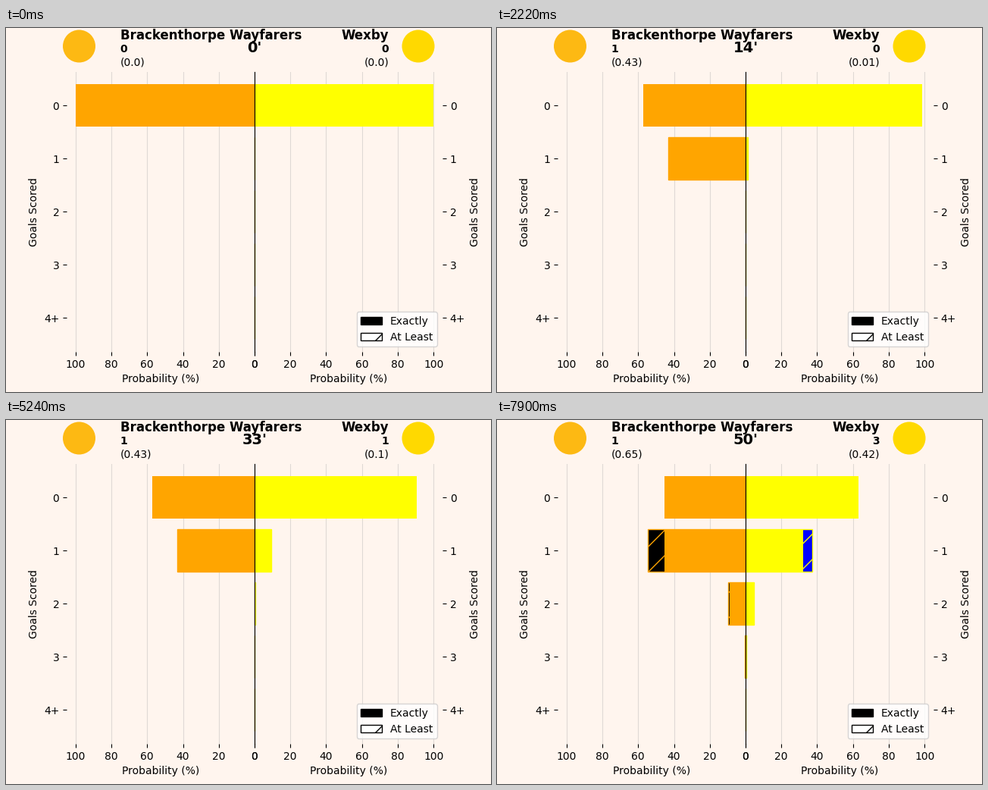
A matplotlib script that plays this animation: 640 px wide and 480 px high, repeating every 8000 ms.

```python
import numpy as np
import matplotlib.pyplot as plt
from matplotlib.animation import FuncAnimation
from matplotlib.patches import Circle, Patch

LOOP, STEP = 8000, 20
MINUTE, TWEEN, TWEENS = 160, 30, 5
BG = "seashell"
ROWS = np.arange(5)

# minute: (side, chance, scored)
SHOTS = {
    7: (0, 0.43, True),
    11: (1, 0.014, False),
    24: (1, 0.043, False),
    30: (1, 0.04, True),
    37: (0, 0.02, False),
    38: (1, 0.065, True),
    43: (1, 0.013, False),
    44: (1, 0.247, True),
    46: (0, 0.1, False),
    48: (0, 0.1, False),
}


def add_shot(dist, p):
    """Goal distribution after one more shot; the last row collects 4+."""
    out = dist * (1 - p)
    out[1:] += dist[:-1] * p
    out[-1] += dist[-1] * p
    return out


def build_timeline():
    """List of (start ms, minute, goals, xg, distributions)."""
    start, goals, xg = 0, [0, 0], [0.0, 0.0]
    dists = np.zeros((2, 5))
    dists[:, 0] = 1
    states = []
    for minute in range(51):
        if minute not in SHOTS:
            states.append((start, minute, tuple(goals), tuple(xg), dists))
            start += MINUTE
            continue
        side, p, scored = SHOTS[minute]
        goals[side] += scored
        xg[side] += p
        new = dists.copy()
        new[side] = add_shot(dists[side], p)
        for k in range(1, TWEENS + 1):
            mix = dists + (new - dists) * k / TWEENS
            states.append((start, minute, tuple(goals), tuple(xg), mix))
            start += TWEEN
        dists = new
    return states


TIMELINE = build_timeline()
STARTS = [s[0] for s in TIMELINE]

fig, axes = plt.subplots(1, 2, figsize=(6.4, 4.8), dpi=100, facecolor=BG)
fig.subplots_adjust(left=0.125, right=0.9, bottom=0.11, top=0.88, wspace=0)


class Side:
    def __init__(self, ax, name, color, under, left):
        ax.set_facecolor(BG)
        ax.set_xlim((105, 0) if left else (0, 105))
        ax.set_ylim(4.64, -0.64)
        ax.set_xticks(range(0, 101, 20))
        ax.set_yticks(ROWS, ["0", "1", "2", "3", "4+"])
        ax.set_xlabel("Probability (%)")
        ax.set_ylabel("Goals Scored")
        ax.set_axisbelow(True)
        ax.grid(axis="x", alpha=0.4)
        for edge in ("top", "bottom", "left" if left else "right"):
            ax.spines[edge].set_visible(False)
        if not left:
            ax.yaxis.tick_right()
            ax.yaxis.set_label_position("right")
        self.least = ax.barh(ROWS[1:], 0, color=under, edgecolor=color, hatch="/")
        self.exact = ax.barh(ROWS, 0, color=color)
        ha = "left" if left else "right"
        ax.text(75, -1.25, name, ha=ha, size=12, weight="bold")
        self.goals = ax.text(75, -1, "", ha=ha, weight="bold")
        self.xg = ax.text(75, -0.75, "", ha=ha)

    def show(self, goals, xg, dist):
        at_least = dist[::-1].cumsum()[::-1]
        for bar, w in zip(self.exact, dist):
            bar.set_width(100 * w)
        for bar, w in zip(self.least, at_least[1:]):
            bar.set_width(100 * w)
        self.goals.set_text(str(goals))
        self.xg.set_text(f"({round(xg, 2)})")


sides = [
    Side(axes[0], "Brackenthorpe Wayfarers", "orange", "black", True),
    Side(axes[1], "Wexby", "yellow", "blue", False),
]
clock = axes[1].text(0, -1, "", ha="center", size=14, weight="bold")
axes[1].legend(
    handles=[
        Patch(facecolor="black", edgecolor="black", label="Exactly"),
        Patch(facecolor="white", edgecolor="black", hatch="/", label="At Least"),
    ],
    loc="lower right",
)
for x, color in ((96.5, "#fdb913"), (544, "#ffd900")):
    fig.add_artist(Circle((x, 456), 21.5, color=color, lw=0, transform=None))


def update(i):
    t = i * STEP + STEP / 2
    _, minute, goals, xg, dists = TIMELINE[np.searchsorted(STARTS, t, "right") - 1]
    clock.set_text(f"{minute}'")
    for side, g, x, d in zip(sides, goals, xg, dists):
        side.show(g, x, d)
    return []


anim = FuncAnimation(fig, update, frames=LOOP // STEP, interval=STEP,
                     repeat=True, repeat_delay=0, init_func=lambda: [])
plt.show()
```
